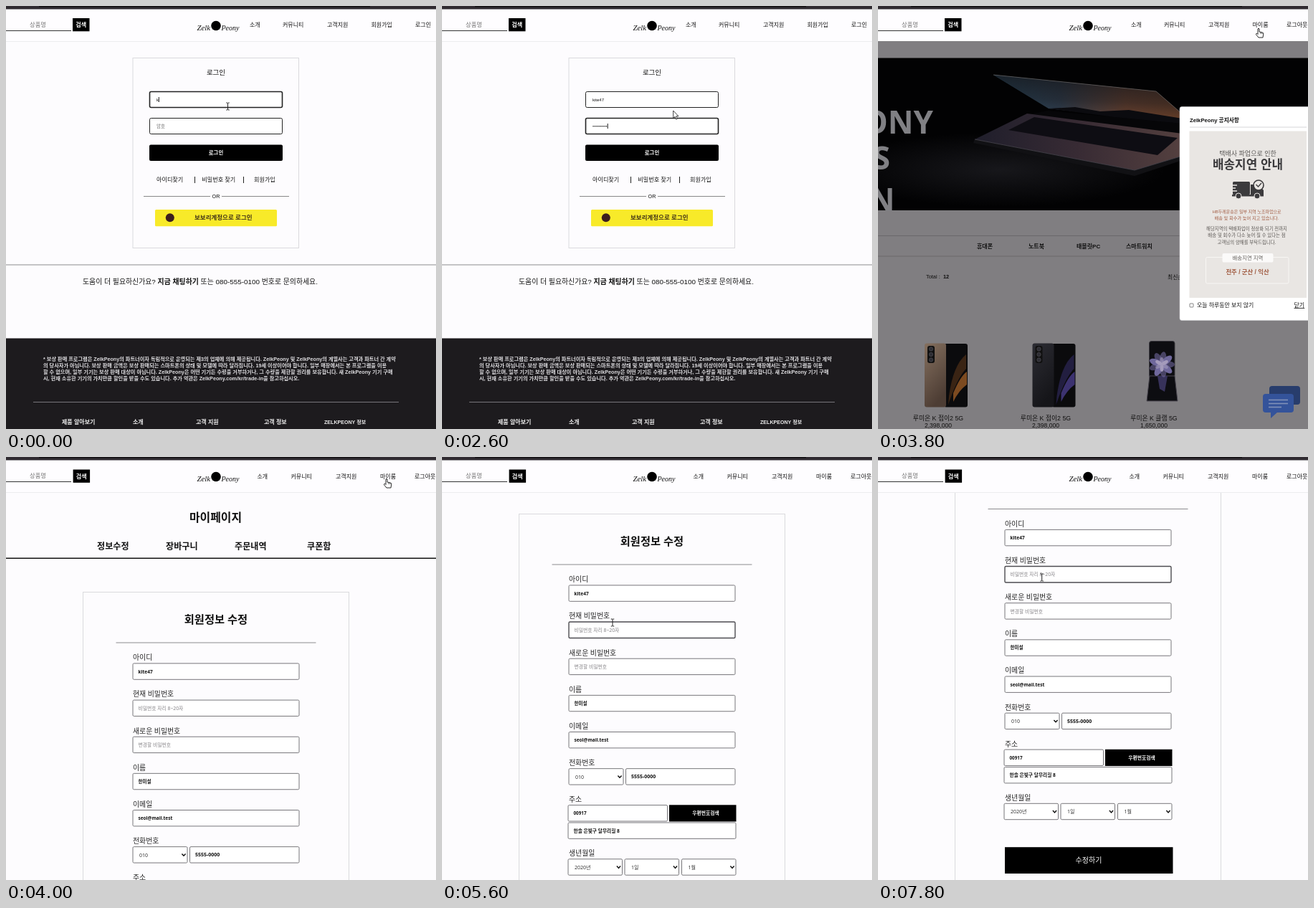
An HTML page that plays this animation: 600 by 590 pixels, repeating every 8 s.

```html
<!DOCTYPE html>
<html lang="ko">
<head>
<meta charset="utf-8">
<title>Shop login</title>
<style>
html, body { margin: 0; width: 100%; height: 100%; overflow: hidden; background: #fdfcfe; }
svg { display: block; width: 600px; height: 590px; }
text { font-family: 'Liberation Sans', 'Noto Sans CJK KR', sans-serif; white-space: pre; }
.form text { font-family: 'Noto Sans', 'Noto Sans CJK KR', sans-serif; }
text.logo { font-family: 'Liberation Serif', serif; font-style: italic; }
text.hero { font-family: 'Open Sans', 'Noto Sans', sans-serif; }
</style>
</head>
<body>
<svg id="stage" viewBox="0 0 600 590"></svg>
<script>
const LOOP = 8000, TICK = 200;
const stage = document.getElementById('stage');

// markup helpers
const text = (x, y, s, size, { fill = '#111', w = 400, at = 'start', more = '' } = {}) =>
  `<text x="${x}" y="${y}" font-size="${size}" fill="${fill}" font-weight="${w}" text-anchor="${at}" ${more}>${s}</text>`;
const mid = (x, y, s, size, o = {}) => text(x, y, s, size, { ...o, at: 'middle' });
const rect = (x, y, x2, y2, fill, more = '') =>
  `<rect x="${x}" y="${y}" width="${x2 - x}" height="${y2 - y}" fill="${fill}" ${more}/>`;
const frame = (x, y, x2, y2, color, more = '') =>
  rect(x, y, x2, y2, 'none', `stroke="${color}" ${more}`);
const hline = (x, x2, y, color, w = 1) =>
  `<path d="M${x} ${y}H${x2}" stroke="${color}" stroke-width="${w}"/>`;
const poly = (pts, fill, more = '') => `<polygon points="${pts}" fill="${fill}" ${more}/>`;
const group = (id, body, more = '') => `<g id="${id}" ${more}>${body}</g>`;

const grad = (id, stops, dir = '') => `<linearGradient id="${id}" ${dir}>` +
  stops.map(([o, c]) => `<stop offset="${o}" stop-color="${c}"/>`).join('') + '</linearGradient>';
const defs = `<defs>
  ${grad('lid', [[0, '#2c5672'], [.35, '#36475a'], [.7, '#7a4a33'], [1, '#74452a']])}
  ${grad('shade', [[.1, '#15161acc'], [.55, '#15161a88'], [1, '#15161a00']], 'x1=".55" y1="0" x2=".4" y2="1"')}
  ${grad('base', [[0, '#1f1e2b'], [.5, '#382b34'], [1, '#54403f']])}
  ${grad('tan', [[0, '#85705f'], [1, '#4d3d34']], 'x2="0.4" y2="1"')}
  ${grad('ink', [[0, '#2c2c33'], [1, '#151519']], 'x2="0.4" y2="1"')}
  <radialGradient id="glow"><stop offset="0" stop-color="#17171b"/><stop offset="1" stop-color="#020203"/></radialGradient>
</defs>`;

// shared header
const nav = (id, items, y) => group(id, items.map(([x, s]) => text(x, y, s, 8, { w: 500 })).join(''));
const header = rect(0, 0, 600, 49, '#fefdff') + rect(0, 0, 600, 4.5, '#2f2a30') + rect(46, 0, 508, 1.2, '#0c0a0d') +
  group('rule', hline(0, 600, 49.5, '#ececef')) +
  text(33, 29.3, '상품명', 8.3, { fill: '#777' }) + hline(0, 91, 34.5, '#333') +
  group('search', rect(93, 17, 116.5, 35.3, '#000') + text(97.2, 29.3, '검색', 8.1, { fill: '#fff', w: 700 })) +
  text(266.5, 34, 'Zelk', 10.8, { more: 'class="logo"' }) +
  '<circle cx="293" cy="27.5" r="6.8" fill="#000"/>' +
  text(300.5, 34, 'Peony', 10, { more: 'class="logo"' }) +
  nav('navLogin', [[340, '소개'], [386, '커뮤니티'], [448, '고객지원'], [509.5, '회원가입'], [571, '로그인']], 29) +
  nav('navMain', [[353, '소개'], [399, '커뮤니티'], [461, '고객지원'], [522.5, '마이룸'], [570, '로그아웃']], 29) +
  nav('navMy', [[350.5, '소개'], [397.5, '커뮤니티'], [460, '고객지원'], [522, '마이룸'], [570, '로그아웃']], 30);

// login page
const terms = [
  '* 보상 판매 프로그램은 ZelkPeony의 파트너이자 독립적으로 운영되는 제3의 업체에 의해 제공됩니다. ZelkPeony 및 ZelkPeony의 계열사는 고객과 파트너 간 계약',
  '의 당사자가 아닙니다. 보상 판매 금액은 보상 판매되는 스마트폰의 상태 및 모델에 따라 달라집니다. 19세 이상이어야 합니다. 일부 매장에서는 본 프로그램을 이용',
  '할 수 없으며, 일부 기기는 보상 판매 대상이 아닙니다. ZelkPeony은 어떤 기기든 수령을 거부하거나, 그 수량을 제한할 권리를 보유합니다. 새 ZelkPeony 기기 구매',
  '시, 현재 소유한 기기의 가치만큼 할인을 받을 수도 있습니다. 추가 약관은 ZelkPeony.com/kr/trade-in을 참고하십시오.'
];
const footCols = [[78, '제품 알아보기', 8], [177, '소개', 8], [265, '고객 지원', 8], [360, '고객 정보', 8], [444, 'ZELKPEONY 정보', 7.1]];
const login = frame(177, 72.5, 408.5, 337.5, '#dadadd') +
  mid(293, 96, '로그인', 9.5, { w: 500 }) +
  `<rect id="idBox" x="200.5" y="119.5" width="185" height="22" rx="2" fill="#fff" stroke="#222"/>
   <rect id="pwBox" x="200.5" y="156.5" width="185" height="22" rx="2" fill="#fff" stroke="#222"/>` +
  text(210, 132.8, '', 6, { more: 'id="idText"' }) +
  text(210, 169.6, '암호', 6.4, { fill: '#666', more: 'id="pwHint"' }) +
  group('dots', '') + '<path id="caret" stroke="#000" stroke-width=".9"/>' +
  rect(200, 193.5, 386, 216, '#000', 'rx="2"') +
  mid(293, 207.3, '로그인', 7.4, { fill: '#fff', w: 700 }) +
  text(210, 245.2, '아이디찾기', 8.1, { w: 500 }) + rect(263, 238, 264, 247, '#222') +
  text(273.3, 245.2, '비밀번호 찾기', 8.1, { w: 500 }) + rect(331, 238, 332, 247, '#222') +
  text(346, 245.2, '회원가입', 8.1, { w: 500 }) +
  hline(192, 285, 265.5, '#888') + hline(301, 395, 265.5, '#888') + mid(293, 268.3, 'OR', 7.2) +
  rect(208, 284, 378, 307.3, '#f8ea29', 'rx="1.5"') + '<circle cx="228.8" cy="295.3" r="6" fill="#3c1e1e"/>' +
  text(263, 298.4, '보보리계정으로 로그인', 8.5, { fill: '#443517', w: 700 }) +
  hline(0, 600, 361, '#8b8b8e') +
  text(107, 388.3, '도움이 더 필요하신가요? <tspan font-weight="700">지금 채팅하기</tspan> 또는 080-555-0100 번호로 문의하세요.', 9.88) +
  rect(0, 463.5, 600, 590, '#1d1b1e') +
  terms.map((s, i) => text(52, 494.7 + i * 9.25, s, 7.2, { fill: '#dedde0', w: 700 })).join('') +
  hline(38, 548, 552.5, '#77757a') +
  footCols.map(([x, s, z]) => text(x, 583.4, s, z, { fill: '#eee', w: 700 })).join('');

// shop page
const petals = (cx, cy, n, r, from, color) => Array.from({ length: n }, (_, i) =>
  `<ellipse cx="${cx}" cy="${cy - r / 2}" rx="${r / 4}" ry="${r / 2}" fill="${color}" fill-opacity="${.6 + .4 * (i % 2)}" transform="rotate(${from + i * 360 / n} ${cx} ${cy})"/>`).join('');
const fold = (x, back, petal, deep) => `<g transform="translate(${x} 470)">` +
  rect(27, 1, 60, 89.5, '#0b0b0d', 'rx="3"') +
  `<path d="M34 74Q40 30 58 16V36Q46 48 33 86Z" fill="${deep}"/><path d="M40 70Q50 46 59 40V58Q48 66 40 82Z" fill="${petal}"/>` +
  rect(0, .5, 30, 89.5, `url(#${back})`, 'rx="3"') + rect(4, 4, 14, 28, '#111', 'rx="3"') +
  [8.5, 16, 23.5].map(y => `<circle cx="9" cy="${y}" r="2.7" fill="#2d2d33" stroke="#55535a" stroke-width=".6"/>`).join('') + '</g>';
const flip = rect(378.5, 467.5, 414, 518, '#0d0d11', 'rx="3" stroke="#3a383f"') +
  poly('379,516 414,516 418,551 375,551', '#0d0d11', 'stroke="#4a4750" stroke-linejoin="round"') +
  poly('390,516 404,516 400,538 393,534', '#37325a') +
  petals(396, 500, 9, 18, 10, '#6f689c') + petals(396, 500, 6, 10, 0, '#a49bbb');
const product = (x, name, price) => mid(x, 578, name, 8.8) + mid(x, 587.7, price, 8.6);
const truck = `<g fill="#3c3b3d">${rect(495, 245, 519, 263, '#3c3b3d', 'rx="1.5"')}
  <path d="M491 250H501M491 254H499M491 258H501" stroke="#e9e6e3" stroke-width="1.4"/>
  <path d="M520 249H531L538 257V264H520Z"/>${rect(494, 263, 538, 265.5, '#3c3b3d')}
  <circle cx="503" cy="265" r="4" stroke="#e9e6e3"/><circle cx="529" cy="265" r="4" stroke="#e9e6e3"/>
  <circle cx="531" cy="250" r="7" fill="#e9e6e3" stroke="#3c3b3d" stroke-width="1.6"/>
  <path d="M527.5 249L530.5 252L535 247" fill="none" stroke="#3c3b3d" stroke-width="1.3"/></g>`;
const brown = { fill: '#a05a40', w: 500 }, gray = { fill: '#5c5855', w: 500 };
const notice = rect(421, 140.5, 606, 438.5, '#fff', 'rx="3" stroke="#cfcfd2" stroke-width=".6"') +
  text(435, 162, 'ZelkPeony 공지사항', 7.7, { w: 700 }) + hline(435, 598, 169, '#d5d5d8') +
  rect(434.5, 174.5, 598, 407, '#e9e6e3') +
  mid(516, 208.8, '택배사 파업으로 인한', 9, { fill: '#5a5856' }) +
  mid(516, 227, '배송지연 안내', 16.9, { fill: '#3a393b', w: 700 }) + truck +
  mid(514.5, 288.8, 'HB두레운송은 일부 지역 노조파업으로', 6, brown) +
  mid(514.5, 298.2, '배송 및 회수가 늦어 지고 있습니다.', 6.2, brown) +
  mid(514.5, 312.5, '해당지역의 택배파업이 정상화 되기 전까지', 6.4, gray) +
  mid(514.5, 322, '배송 및 회수가 다소 늦어 질 수 있다는 점', 6.4, gray) +
  mid(514.5, 331.6, '고객님의 양해를 부탁드립니다.', 6.4, gray) +
  frame(457.5, 350.5, 573, 387, '#f8f6f4', 'rx="2"') + rect(480.5, 345, 551.5, 357.5, '#fbfaf9', 'rx="2"') +
  mid(516, 354, '배송지연 지역', 7.4, { fill: '#66625f' }) +
  mid(515.5, 373.8, '전주 / 군산 / 익산', 8.4, { ...brown, w: 700 }) +
  rect(435, 415, 440, 420, '#fff', 'stroke="#666" stroke-width=".8" rx=".8"') +
  text(445, 420, '오늘 하루동안 보지 않기', 7.9) +
  text(580.5, 420, '닫기', 8, { more: 'text-decoration="underline"' });
const LID = '161,96 388,119 425,151 425,162 330,153 238,143';
const hero = rect(0, 72.5, 600, 285, '#020203') +
  '<ellipse cx="170" cy="228" rx="230" ry="52" fill="url(#glow)"/>' +
  poly('237,146 425,164 425,185 205,152', '#060608') +
  poly('208,150 425,178 425,209 358,229 135,186', 'url(#base)') +
  poly('218,155 418,184 390,208 182,173', '#0e0d13') +
  poly('135,186 358,229 425,209 425,215 358,237 133,191', '#111114') +
  '<path d="M135 186L358 229L425 209" fill="none" stroke="#4a4750" stroke-width=".8"/>' +
  poly(LID, 'url(#lid)') + poly(LID, 'url(#shade)') +
  '<path d="M238 143L275 141L310 147L350 145L425 157V164L330 155Z" fill="#0b0b0f"/>' +
  '<path d="M161 96L388 119L425 151" fill="none" stroke="#6a6868" stroke-width=".7"/>' +
  [[77, 178, 'EONY'], [17, 228, 'S'], [23.5, 286, 'N']].map(([x, y, s]) =>
    text(x, y, s, 44, { fill: '#808084', w: 700, at: 'end', more: 'class="hero"' })).join('');
const chat = rect(546, 530, 589, 556, '#283d6c', 'rx="4"') +
  rect(537, 541, 580, 567, '#34539a', 'rx="4"') + poly('548,566 558,566 548,575', '#34539a') +
  hline(545, 572, 549.5, '#8091b8', 1.6) + hline(545, 572, 554.5, '#8091b8', 1.6) + hline(545, 563, 559.5, '#8091b8', 1.6);
const shop = rect(0, 49, 600, 590, '#807e81') + hero +
  hline(0, 600, 320.5, '#6a686b') + hline(0, 600, 349, '#6a686b') +
  [[138, '휴대폰'], [210, '노트북'], [277, '태블릿PC'], [346, '스마트워치']].map(([x, s]) => text(x, 337.8, s, 8, { w: 700 })).join('') +
  text(67, 380.3, 'Total :', 7.4) + text(91, 380.3, '12', 7.4, { w: 700 }) + text(404, 380.8, '최신순', 7.8) +
  fold(65, 'tan', '#7c4a20', '#3a2414') + fold(215.5, 'ink', '#3c3270', '#221e40') + flip +
  product(84, '루미온 K 접이2 5G', '2,398,000') + product(234, '루미온 K 접이2 5G', '2,398,000') +
  product(385, '루미온 K 클램 5G', '1,650,000') + chat + notice;

// account page
const STEP = 51.15, FIELD = 287.9;
const rowY = i => FIELD + i * STEP;
const box = (x, x2, y, more = '') => rect(x, y, x2, y + 22.4, '#fff', `stroke="#77767a" rx="1.5" ${more}`);
const value = (x, y, s, size = 6.5) => text(x, y + 13.6, s, size, { w: 700 });
const hint = (y, s) => text(184.5, y + 13.8, s, 6.8, { fill: '#858387' });
const select = (x, x2, y, s) => box(x, x2, y) + text(x + 9, y + 13.9, s, 7, { fill: '#333' }) +
  `<path d="M${x2 - 7.6} ${y + 9.8}l2.6 2.8l2.6 -2.8" fill="none" stroke="#111" stroke-width="1.5"/>`;
const label = (y, s) => text(177, y - 4.6, s, 9.9, { fill: '#222' });
const labels = ['아이디', '현재 비밀번호', '새로운 비밀번호', '이름', '이메일', '전화번호'];
const tabs = [[127, '정보수정'], [223, '장바구니'], [319, '주문내역'], [420, '쿠폰함']];
const account = mid(292.5, 90, '마이페이지', 15.9, { w: 700 }) +
  tabs.map(([x, s]) => text(x, 129, s, 12.1, { w: 700 })).join('') + hline(0, 600, 141.3, '#111', 1.5) +
  frame(107.5, 188.5, 478.5, 900, '#dadadd') +
  mid(293, 231.5, '회원정보 수정', 15.3, { w: 700 }) + hline(153.5, 432.5, 259, '#8b8b8e') +
  labels.map((s, i) => label(rowY(i), s)).join('') +
  [0, 1, 2, 3, 4].map(i => box(177, 409, rowY(i), 'class="row"')).join('') +
  value(184.5, rowY(0), 'kite47') + hint(rowY(1), '비밀번호 자리 8~20자') + hint(rowY(2), '변경할 비밀번호') +
  value(184.5, rowY(3), '한미설') + value(184.5, rowY(4), 'seol@mail.test') +
  select(177, 253, rowY(5), '010') + box(256.5, 409, rowY(5)) + value(264, rowY(5), '5555-0000', 7) +
  label(594.6, '주소') + box(176, 314.5, 594.6) + value(183.5, 594.6, '00917', 6.3) +
  rect(317, 594.3, 410.5, 617.5, '#000') + mid(368, 608.3, '우편번호검색', 6.8, { fill: '#fff', w: 700 }) +
  box(176, 410, 619) + value(183.5, 619, '한솔 은빛구 달무리길 8', 6.7) +
  label(669.8, '생년월일') + select(176, 251.5, 669.8, '2020년') + select(255, 330.5, 669.8, '1일') + select(334.5, 410, 669.8, '1월') +
  rect(177, 730.7, 411.5, 767.5, '#000') + mid(294, 752.7, '수정하기', 10, { fill: '#fff', w: 500 });

// pointers, hot spot at 0,0
const pointers = group('arrow', '<path d="M0 0V10.5L2.4 8.3L4 12L5.7 11.2L4.1 7.7H7.3Z" fill="#fff" stroke="#111" stroke-width=".8"/>') +
  group('beam', '<path d="M-2.2 -5H-.6L0 -4.4L.6 -5H2.2M-2.2 5H-.6L0 4.4L.6 5H2.2M0 -4.4V4.4" fill="none" stroke="#222" stroke-width="1"/>') +
  group('hand', '<path d="M-1 1Q0 -1 1 1V5L5.5 6Q7 6.3 6.8 8L6 13H0L-3.6 8.6Q-3.6 7 -2 7.5L-1 8.5Z" fill="#fff" stroke="#111" stroke-width=".9"/><path d="M3 5.8V8M5 6.2V8" stroke="#111" stroke-width=".7"/>');

stage.innerHTML = defs + rect(0, 0, 600, 590, '#fdfcfe') + group('login', login) + group('shop', shop) +
  group('account', account, 'class="form"') + header + pointers;

const el = id => document.getElementById(id);
const show = (id, on) => el(id).setAttribute('display', on ? 'inline' : 'none');
const rows = [...stage.querySelectorAll('.row')];

// piecewise linear track of [time, ...values]
function track(keys, t) {
  const i = keys.findIndex(k => k[0] > t);
  if (i === 0) return keys[0].slice(1);
  if (i < 0) return keys[keys.length - 1].slice(1);
  const a = keys[i - 1], b = keys[i], p = (t - a[0]) / (b[0] - a[0]);
  return a.slice(1).map((v, j) => v + (b[j + 1] - v) * p);
}
const mouse = [[0, 309.5, 140], [800, 309.5, 140], [1400, 321, 166], [1600, 321, 166], [2000, 322.7, 146], [3000, 322.7, 146],
  [3600, 520, 48], [3800, 531, 31], [4000, 531, 30], [4600, 300, 190], [4800, 240, 228], [5200, 238, 231],
  [5600, 238, 231], [5800, 239, 229], [6000, 239, 229], [6200, 240, 227], [7000, 240, 227], [7400, 236, 195], [7800, 228.7, 168]];
const scroll = [[4800, 0], [5200, 84], [5400, 109], [6400, 109], [6600, 131.8], [6800, 186.5]];
const typed = [[0, 1], [200, 3], [400, 5], [600, 6]];
const secret = [[1800, 0], [2000, 2], [2200, 5], [2400, 8], [2600, 10]];

function pointerKind(t) {
  if (t >= 3800 && t < 4200) return 'hand';
  return t < 1800 || t >= 4800 ? 'beam' : 'arrow';
}

function drawLogin(t) {
  const inPw = t >= 1600, n = Math.round(track(secret, t)[0]);
  el('idText').textContent = 'kite47'.slice(0, Math.round(track(typed, t)[0]));
  el('idBox').setAttribute('stroke-width', inPw ? 1 : 1.6);
  el('pwBox').setAttribute('stroke-width', inPw ? 1.6 : 1);
  show('pwHint', n === 0);
  el('dots').innerHTML = Array.from({ length: n }, (_, i) => `<circle cx="${211 + i * 2.07}" cy="167.8" r=".7"/>`).join('');
  const x = inPw ? 210.5 + n * 2.07 : 210.3 + el('idText').getComputedTextLength();
  el('caret').setAttribute('d', `M${x} ${inPw ? 164 : 127}v7`);
}

function draw(time) {
  const t = Math.floor(time % LOOP / TICK) * TICK;
  const scene = t < 3000 ? 'login' : t < 4000 ? 'shop' : 'account';
  for (const [id, bar] of [['login', 'navLogin'], ['shop', 'navMain'], ['account', 'navMy']]) {
    show(id, id === scene);
    show(bar, id === scene);
  }
  show('rule', scene !== 'shop');
  el('search').setAttribute('transform', `translate(${scene === 'account' ? '.6 .5' : '0 0'})`);
  const [x, y] = track(mouse, t), [s] = track(scroll, t);
  if (scene === 'login') drawLogin(t);
  if (scene === 'account') {
    el('account').setAttribute('transform', `translate(0 ${-s})`);
    rows.forEach((r, i) => {
      const over = x > 177 && x < 409 && y + s > rowY(i) && y + s < rowY(i) + 23;
      r.setAttribute('stroke', over ? '#4c4b50' : '#77767a');
      r.setAttribute('stroke-width', over ? 1.4 : 1);
    });
  }
  const kind = pointerKind(t);
  for (const id of ['arrow', 'beam', 'hand']) show(id, id === kind);
  el(kind).setAttribute('transform', `translate(${x} ${y})`);
}

const start = performance.now();
(function loop() {
  draw(performance.now() - start);
  requestAnimationFrame(loop);
})();
</script>
</body>
</html>
```
